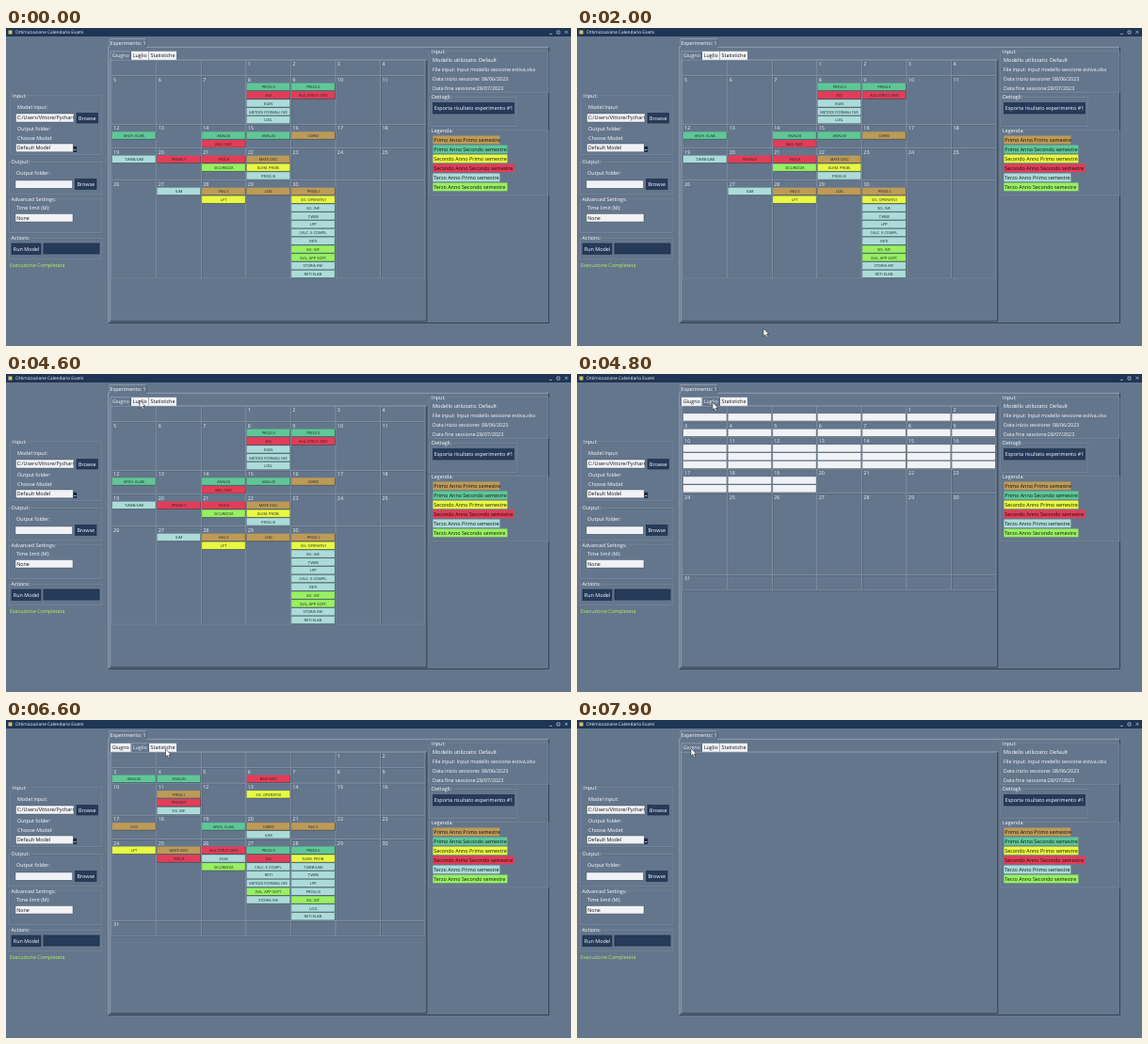
An HTML page that plays this animation: 600x338 px, repeating every 8 s.

```html
<!DOCTYPE html>
<html lang="it">
<head>
<meta charset="utf-8">
<title>Calendario</title>
<style>
  html, body { margin: 0; width: 100%; height: 100%; overflow: hidden; background: #64768c; }
  svg { display: block; width: 100vw; height: 100vh; }
  text { font-family: "Open Sans", "Noto Sans", sans-serif; white-space: pre; text-rendering: geometricPrecision; }
</style>
</head>
<body>
<svg id="stage" viewBox="0 0 600 338" preserveAspectRatio="none"></svg>
<script>
const BACK = '#64768c', NAVY = '#263a5a', FIELD = '#f0f2f6', LIGHT = '#8c9aac', DARK = '#4c5b70';
const COLORS = { tan: '#bd9a57', green: '#5fc796', yellow: '#e9f942', red: '#e23d58', cyan: '#abdcd9', lime: '#98f062' };
const COLUMN = 47.55, LEFT = 112.5, TOP = 34.4, HEADER = 7.7, SLOT = 8.8;

const rect = (x, y, w, h, fill, extra = '') =>
  `<rect x="${x}" y="${y}" width="${w}" height="${h}" fill="${fill}" ${extra}/>`;
// Text is placed by its left edge (or middle) and vertical centre.
const text = (s, x, y, fill = '#fff', size = 5.4, anchor = 'start') =>
  `<text x="${x}" y="${y + size * 0.35}" fill="${fill}" font-size="${size}" text-anchor="${anchor}">${s}</text>`;
const stroke = (d, color, width = 0.6) => `<path d="${d}" fill="none" stroke="${color}" stroke-width="${width}"/>`;

function groove(x, y, w, h) {
  const box = (dx, color) => rect(x + dx, y + dx, w, h, 'none', `stroke="${color}" stroke-width=".5"`);
  return box(0.5, DARK) + box(0, LIGHT);
}
function group(label, x, y, right, bottom, labelWidth) {
  return groove(x, y, right - x, bottom - y) + rect(x + 1.5, y - 2, labelWidth, 5, BACK) + text(label, x + 2, y);
}
function raised(x, y, right, bottom) {
  return stroke(`M${x} ${bottom}V${y}H${right}`, '#a5b1bf', 0.7) + stroke(`M${x} ${bottom}H${right}V${y}`, '#2f3d50', 0.9);
}
function tabEdge(x, y, right, bottom) {
  return stroke(`M${x} ${bottom}V${y}H${right}`, '#a5b1bf', 0.6) + stroke(`M${right} ${y}V${bottom}`, DARK, 0.6);
}
function button(label, x, y, w, h) {
  return rect(x, y, w, h, NAVY, 'stroke="#1b2940" stroke-width=".6"') + text(label, x + w / 2, y + h / 2, '#fff', 5.45, 'middle');
}
function field(x, y, w, h, value = '') {
  return rect(x, y, w, h, FIELD, 'stroke="#3d4b5e" stroke-width=".4"') +
    `<svg x="${x}" y="${y}" width="${w}" height="${h}">${text(value, 1.2, h / 2, '#111')}</svg>`;
}

function titleBar() {
  return rect(0, 0, 600, 9, '#1f3555') + rect(2.5, 2.5, 4, 4, '#d8c268') +
    text('Ottimizzazione Calendario Esami', 10, 4.4, '#fff', 4.75) +
    stroke('M577 6.3h3M585 3h3v3h-3zM593.5 2.8l3 3m0-3l-3 3', '#dfe5ec');
}

function sidebar() {
  return group('Input:', 5, 72, 102, 134.5, 16) +
    text('Model Input:', 12, 84) + field(10.5, 91, 61.5, 9, 'C:/Users/Vittore/PycharmProjects') + button('Browse', 75, 90.5, 22.5, 10.5) +
    text('Output folder:', 12, 107) + text('Choose Model:', 12, 117.5) +
    field(10.5, 123, 60.7, 8.8, 'Default Model') + rect(71.6, 125.8, 3.5, 6, '#172640') + stroke('M72.3 129.5h2', '#fff', 0.8) +
    group('Output:', 3.5, 142.5, 102, 177, 21) +
    text('Output folder:', 11, 154) + field(10, 162, 60.5, 8.2) + button('Browse', 73.5, 160.5, 22.5, 11) +
    group('Advanced Settings:', 3.5, 182, 102, 217.5, 50) +
    text('Time limit (M):', 11, 191) + field(10, 197.5, 61, 8.5, 'None') +
    group('Actions:', 3.5, 223.5, 102, 246, 22) +
    button('Run Model', 6, 229, 31, 11.5) + rect(40, 229, 59, 11, NAVY, 'stroke="#1b2940" stroke-width=".7"') +
    text('Esecuzione Completata', 4, 252.5, '#b4f25c');
}

function details() {
  const legend = [
    ['Primo Anno Primo semestre', 'tan', 71], ['Primo Anno Secondo semestre', 'green', 79],
    ['Secondo Anno Primo semestre', 'yellow', 79], ['Secondo Anno Secondo semestre', 'red', 86.3],
    ['Terzo Anno Primo semestre', 'cyan', 71], ['Terzo Anno Secondo semestre', 'lime', 79]];
  return group('Input:', 450, 25, 576, 68.5, 16) +
    text('Modello utilizzato: Default', 453, 34, '#fff', 5.6) +
    text('File input: Input modello sessione estiva.xlsx', 453, 44, '#fff', 5.3) +
    text('Data inizio sessione: 08/06/2023', 453, 53.7, '#fff', 5.35) +
    text('Data fine sessione:28/07/2023', 453, 63.7, '#fff', 5.35) +
    group('Dettagli:', 450, 73.5, 543, 104.5, 23) +
    button('Esporta risultato esperimento #1', 453.5, 79.5, 86, 11.5) +
    group('Legenda:', 450, 109, 576, 178, 25) +
    legend.map(([s, c, w], i) =>
      rect(453.4, 114.5 + i * 10, w, 8.8, COLORS[c]) + text(s, 454.2, 118.9 + i * 10, '#111', 5.4)).join('');
}

function tabs(selected) {
  return [['Giugno', 111, 21.5], ['Luglio', 133, 18.5], ['Statistiche', 152, 29]].map(([name, x, w], i) => {
    const active = i === selected;
    return rect(x, 24.8, w, 9, active ? BACK : FIELD) + (active ? tabEdge(x, 24.8, x + w, 33.8) : '') +
      text(name, x + w / 2, 29.2, active ? '#eef2f6' : '#111', 5.4, 'middle');
  }).join('');
}

// A flat tile with a dark lower right edge.
function tile(x, y, color) {
  return rect(x + 0.5, y, 46.2, 8, color) + stroke(`M${x + 0.5} ${y + 8}h46.2v-8`, '#33424a', 0.6);
}

// Each week maps a column to its exams ("name|colour"); its height follows the longest list.
function calendar(startColumn, days, weeks, placeholders = 0) {
  let out = '', top = TOP, cells = 0;
  weeks.forEach((week, row) => {
    const slots = Math.max(1, ...Object.values(week).map(list => list.length));
    const height = HEADER + slots * SLOT;
    for (let column = 0; column < 7; column++) {
      const x = LEFT + column * COLUMN, day = row * 7 + column - startColumn + 1;
      out += groove(x, top, COLUMN - 0.4, height - 0.4);
      if (day > 0 && day <= days) out += text(day, x + 1.6, top + 3.9, '#eef2f6', 5.4);
      const empty = cells++ < placeholders;
      for (let i = 0; i < slots; i++) {
        const y = top + HEADER + i * SLOT, exam = week[column]?.[i];
        if (empty) out += tile(x, y, FIELD);
        else if (exam && !placeholders) {
          const [name, color] = exam.split('|');
          out += tile(x, y, COLORS[color]) + text(name, x + 23.6, y + 4.1, '#17262b', 4, 'middle');
        }
      }
    }
    top += height;
  });
  return out;
}

const june = [
  {},
  { 3: ['PROG II|green', 'EGI|red', 'EGIN|cyan', 'METODI FORMALI INF.|cyan', 'LOG.|cyan'],
    4: ['PROG II|green', 'ALG.STRUT. DATI|red'] },
  { 0: ['ARCH. ELAB.|green'], 2: ['ANALISI|green', 'BASI DATI|red'], 3: ['ANALISI|green'], 4: ['CMRO|tan'] },
  { 0: ['T.WEB/UMI|cyan'], 1: ['PRIVACY|red'], 2: ['FISICA|red', 'SICUREZZA|lime'],
    3: ['MATE DISC|tan', 'ELEM. PROB.|yellow', 'PROG III|cyan'] },
  { 1: ['IUM|cyan'], 2: ['ING S|tan', 'LFT|yellow'], 3: ['LOG|tan'],
    4: ['PROG I|tan', 'SIS. OPERATIVI|yellow', 'SIS. INF.|cyan', 'T.WEB|cyan', 'LPP|cyan', 'CALC. E COMPL.|cyan',
      'RETI|cyan', 'SIS. INT.|lime', 'SVIL. APP SOFT.|lime', 'STORIA INF.|cyan', 'RETI ELAB.|cyan'] }
];
const july = [
  {},
  { 0: ['ANALISI|green'], 1: ['ANALISI|green'], 3: ['BASI DATI|red'] },
  { 1: ['PROG I|tan', 'PRIVACY|red', 'SIS. INF.|cyan'], 3: ['SIS. OPERATIVI|yellow'] },
  { 0: ['LOG|tan'], 2: ['ARCH. ELAB.|green'], 3: ['CMRO|tan', 'IUM|cyan'], 4: ['ING S|tan'] },
  { 0: ['LFT|yellow'], 1: ['MATE DISC|tan', 'FISICA|red'], 2: ['ALG.STRUT. DATI|red', 'EGIN|cyan', 'SICUREZZA|lime'],
    3: ['PROG II|green', 'EGI|red', 'CALC. E COMPL.|cyan', 'RETI|cyan', 'METODI FORMALI INF.|cyan',
      'SVIL. APP SOFT.|lime', 'STORIA INF.|cyan'],
    4: ['PROG II|green', 'ELEM. PROB.|yellow', 'T.WEB/UMI|cyan', 'T.WEB|cyan', 'LPP|cyan', 'PROG III|cyan',
      'SIS. INT.|lime', 'LOG|cyan', 'RETI ELAB.|cyan'] },
  {}
];

// [start time, selected tab, content]
const views = [
  [0, 0, calendar(3, 30, june)],
  [4700, 1, ''],
  [4800, 1, calendar(5, 31, july, 24)],
  [4900, 1, calendar(5, 31, july)],
  [6700, 2, ''],
  [7800, 0, '']
];
// [time, x, y] of the pointer tip
const path = [
  [1400, 50, 297], [1600, 198, 319.5], [2000, 198, 319.5], [2400, 310, 328], [2800, 588, 254], [3100, 433.5, 202.5],
  [3700, 337, 239], [3800, 226, 100], [3900, 226, 100], [4500, 142, 28], [4600, 142, 28], [4800, 144, 30],
  [5900, 144, 30], [6500, 169.5, 31], [6800, 169.5, 31], [7500, 207, 288], [7800, 121, 30], [8000, 121, 30]
];

const stage = document.getElementById('stage');
stage.innerHTML = rect(0, 0, 600, 338, BACK) + titleBar() + sidebar() +
  raised(108.7, 20.3, 576.5, 313.5) + rect(110, 11.5, 39, 9.5, BACK) + tabEdge(110, 11.5, 149, 20) +
  text('Esperimento: 1', 110.7, 15.8) + raised(110.7, 34, 446.8, 311.8) + details() +
  views.map(([, tab, content]) => `<g class="view">${content}${tabs(tab)}</g>`).join('') +
  '<path id="pointer" d="M0 0V8.2L1.9 6.5 3.2 9.4 4.6 8.8 3.3 6H5.8Z" fill="#fff" stroke="#111" stroke-width=".5"/>';
const viewNodes = stage.querySelectorAll('.view'), pointer = document.getElementById('pointer');

function draw(now) {
  const t = Math.floor(now % 8000 / 100) * 100; // ten pictures per second
  const current = views.findLastIndex(([start]) => start <= t);
  viewNodes.forEach((node, i) => node.setAttribute('display', i === current ? 'inline' : 'none'));
  const next = path.findIndex(([time]) => time > t);
  pointer.setAttribute('display', next > 0 ? 'inline' : 'none');
  if (next > 0) {
    const [t0, x0, y0] = path[next - 1], [t1, x1, y1] = path[next], k = (t - t0) / (t1 - t0);
    pointer.setAttribute('transform', `translate(${x0 + (x1 - x0) * k} ${y0 + (y1 - y0) * k})`);
  }
}

const begin = performance.now();
function tick() {
  draw(performance.now() - begin);
  requestAnimationFrame(tick);
}
tick();
</script>
</body>
</html>
```
